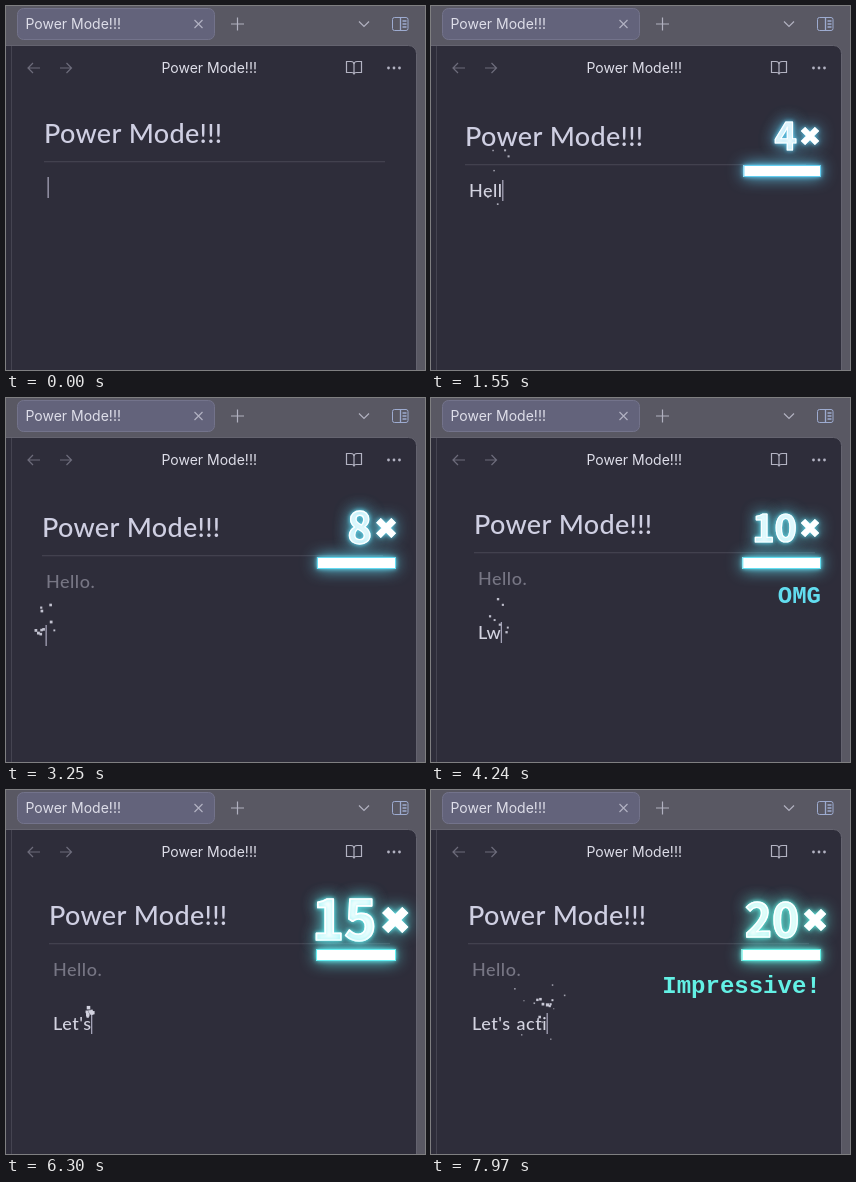
Animation, 419 px wide and 364 px high, one loop 8000 ms. Source, as an HTML page with a canvas:

```html
<!DOCTYPE html>
<html lang="en">
<head>
<meta charset="utf-8">
<title>Power Mode!!!</title>
<style>
  html, body { margin: 0; width: 100%; height: 100%; overflow: hidden; background: #2e2d3a; }
  canvas { display: block; }
</style>
</head>
<body>
<canvas id="stage" width="419" height="364"></canvas>
<script>
const ctx = document.getElementById('stage').getContext('2d');
const LOOP = 8000;
const NOTE = 'Lato, sans-serif';
const UI = '14px Inter, "Noto Sans", sans-serif';
const COUNTER = '900 38px "Noto Sans CJK SC", "Noto Sans CJK", sans-serif';
const SHOUT = 'bold 24px "Liberation Mono", monospace';

// Keystrokes: time, key, then the jolt given to the note (x, y).
const KEYS = [
  [120, 'H', -3, 2], [470, 'e', 3, -2], [823, 'l', 4, -1], [1250, 'l', -4, 3],
  [1730, 'o', 2, 4], [2190, '.', -4, 4], [2680, '\n', 3, -3], [3130, '\n', -2, 2],
  [3620, 'L', -4, -2], [4080, 'w', 5, -1], [4400, '<', -3, 3], [4710, 'e', 2, -4],
  [5040, 't', 5, -3], [5680, "'", -4, 2], [6297, 's', 5, -2], [6620, ' ', -3, 3],
  [6950, 'a', 4, 1], [7270, 'c', -2, -3], [7590, 't', 3, 2], [7893, 'i', -1, -2]
].map(([time, key, dx, dy]) => ({ time, key, dx, dy }));

let typed = '';
for (const k of KEYS) {
  typed = k.key === '<' ? typed.slice(0, -1) : typed + k.key;
  k.text = typed;
}

function random(seed) {
  const x = Math.sin(seed * 127.1 + 11.7) * 43758.5453;
  return x - Math.floor(x);
}

const hue = count => `hsl(${200 - 1.25 * count}, 85%, 67%)`;

function setFont(font, spacing = 0, wordSpacing = 0) {
  ctx.font = font;
  ctx.letterSpacing = spacing + 'px';
  ctx.wordSpacing = wordSpacing + 'px';
}

function text(str, x, y, color) {
  ctx.fillStyle = color;
  ctx.fillText(str, x, y);
}

const noteFont = () => setFont('500 18px ' + NOTE, 0.5, 1);

function stroke(path, color, width = 1.2) {
  ctx.strokeStyle = color;
  ctx.lineWidth = width;
  ctx.stroke(new Path2D(path));
}

function box(x, y, w, h, radius, fill, border) {
  ctx.beginPath();
  ctx.roundRect(x, y, w, h, radius);
  if (fill) { ctx.fillStyle = fill; ctx.fill(); }
  if (border) { ctx.strokeStyle = border; ctx.lineWidth = 1; ctx.stroke(); }
}

function drawWindow() {
  ctx.fillStyle = '#595863';
  ctx.fillRect(0, 0, 419, 364);
  box(-10, 39.5, 420.5, 340, 8, '#2e2d3a', '#64636f');
  stroke('M5.5 40V364', '#454451', 1);

  setFont(UI);
  box(11.5, 2.5, 197, 31, 6, '#63637b', '#73738b');
  text('Power Mode!!!', 19.5, 23, '#dedee9');
  stroke('M188.5 14l8 8M196.5 14l-8 8', '#b1b1c2');
  stroke('M225 18h13M231.5 11.5v13', '#b1b1c0');
  stroke('M353 15.5l5 5 5-5', '#b1b1c0');
  box(386.5, 11.5, 15.5, 13, 2, null, '#9dabd0');
  stroke('M394.5 12v12M396.5 15h4M396.5 18h4M396.5 21h4', '#9dabd0', 1.3);

  stroke('M34 62H22M27 57l-5 5 5 5M54 62h11.5M60.5 57l5 5-5 5', '#6d6c7b');
  text('Power Mode!!!', 155.5, 67, '#dedee9');
  stroke('M340.5 55.5h4.5q3 0 3 3v10q0-2-2.5-2h-5zM355.5 55.5h-4.5q-3 0-3 3v10q0-2 2.5-2h5z', '#b3b3c2');
  ctx.fillStyle = '#b3b3c2';
  for (const x of [382.5, 388, 393.5]) {
    ctx.beginPath();
    ctx.arc(x, 62, 1.4, 0, 7);
    ctx.fill();
  }
}

function drawNote(current) {
  const rows = (current ? current.text : '').split('\n');
  const last = rows.length - 1;
  setFont('500 27px ' + NOTE, 0.3);
  text('Power Mode!!!', 38, 137, '#cfcfe2');
  ctx.fillStyle = '#42414e';
  ctx.fillRect(38, 155, 341, 1.3);
  noteFont();
  rows.forEach((row, i) => text(row, 42, 188 + i * 27, i === last ? '#d3d3e0' : '#777684'));
  ctx.fillStyle = '#a3a2b6';
  ctx.fillRect(41.5 + ctx.measureText(rows[last]).width, 171 + last * 27, 1.3, 21);
}

function drawSparks(t) {
  noteFont();
  ctx.fillStyle = '#d3d3e0';
  KEYS.forEach((k, n) => {
    const age = (t - k.time) / 1000;
    if (age < 0 || age > 0.5) return;
    const rows = k.text.split('\n');
    const x0 = 40 + ctx.measureText(rows[rows.length - 1]).width;
    const y0 = 173 + (rows.length - 1) * 27;
    const count = 6 + Math.floor(random(n) * 5);
    const flight = age + 0.06;
    ctx.globalAlpha = 1 - age * 0.8;
    for (let i = 0; i < count; i++) {
      const seed = n * 31 + i * 3;
      const x = x0 + (random(seed) * 2 - 1) * 60 * flight;
      const y = y0 - (170 * random(seed + 1) - 20) * flight + 125 * flight * flight;
      const size = (2.2 + 1.4 * random(seed + 2)) * (1 - age * 1.4);
      ctx.fillRect(x - size / 2, y - size / 2, size, size);
    }
  });
  ctx.globalAlpha = 1;
}

function glow(color, draw) {
  ctx.shadowColor = color;
  for (const blur of [16, 4]) {
    ctx.shadowBlur = blur;
    draw();
  }
  ctx.shadowBlur = 0;
}

function drawCounter(t, count) {
  const age = t - KEYS[count - 1].time;
  const color = hue(count);
  const scale = 1 + 0.45 * Math.max(0, 1 - age / 150);

  ctx.save();
  setFont(COUNTER);
  const half = (ctx.measureText(count).width + 24) / 2;
  ctx.translate(390 - half, 130);
  ctx.scale(scale, scale);
  ctx.lineJoin = 'round';
  glow(color, () => {
    text(count, -half, 14, '#fff');
    ctx.strokeStyle = '#fff';
    ctx.lineWidth = 1.2;
    ctx.strokeText(count, -half, 14);
    const x = half - 11;
    stroke(`M${x - 7} -7l14 14M${x + 7} -7l-14 14`, '#fff', 6);
  });
  ctx.restore();

  const width = 80 * (1 - age / 10000);
  ctx.fillStyle = '#fff';
  glow(color, () => ctx.fillRect(390 - width, 159, width, 12));
  ctx.strokeStyle = color;
  ctx.lineWidth = 1;
  ctx.strokeRect(390.5 - width, 159.5, width - 1, 11);
}

function drawShout(t, word, count) {
  const p = (t - KEYS[count - 1].time) / 1600;
  if (p < 0 || p > 1) return;
  setFont(SHOUT);
  ctx.globalAlpha = 1 - p * p;
  ctx.textAlign = 'right';
  text(word, 389.5 + 4.5 * p, 200 + 53 * p, hue(count));
  ctx.textAlign = 'left';
  ctx.globalAlpha = 1;
}

function draw(t) {
  const count = KEYS.filter(k => k.time <= t).length;
  const current = KEYS[count - 1];
  drawWindow();
  ctx.save();
  if (current) ctx.translate(current.dx, current.dy);
  drawNote(current);
  drawSparks(t);
  ctx.restore();
  if (count) drawCounter(t, count);
  drawShout(t, 'OMG', 10);
  drawShout(t, 'Impressive!', 20);
}

const start = performance.now();
function tick() {
  draw((performance.now() - start) % LOOP);
  requestAnimationFrame(tick);
}
tick();
</script>
</body>
</html>
```
